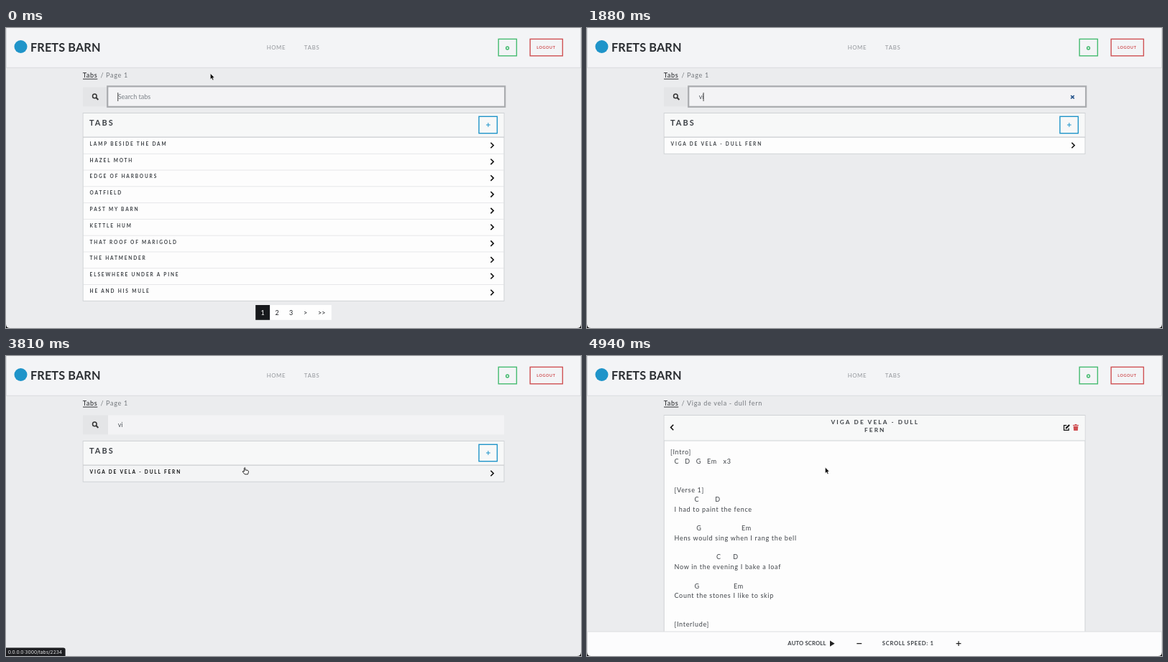
Write an HTML page that moves like this. It is 800 px wide and 418 px high and loops after 5 s.

```html
<!DOCTYPE html>
<html lang="en">
<head>
<meta charset="utf-8">
<title>Tabs search</title>
<style>
  html, body { margin: 0; width: 100%; height: 100%; overflow: hidden; background: #ebecee; }
  svg { display: block; width: 800px; height: 418px; font-family: Lato, sans-serif; }
</style>
</head>
<body>
<svg id="stage" viewBox="0 0 800 418"></svg>
<script>
const LOOP = 5000, ROW = 22.78, LINE = 13.35;
const GREEN = '#45bb70', RED = '#cf5053', BLUE = '#1f94c9';

const text = (x, y, size, str, fill, spacing = 0, more = '') =>
  `<text x="${x}" y="${y}" font-size="${size}" fill="${fill}" letter-spacing="${spacing}" ${more}>${str}</text>`;
const rect = (x, y, w, h, fill, more = '') =>
  `<rect x="${x}" y="${y}" width="${w}" height="${h}" fill="${fill}" ${more}/>`;
const frame = (x, y, w, h, color, width = 1.4, fill = 'none') =>
  rect(x, y, w, h, fill, `stroke="${color}" stroke-width="${width}"`);
const line = (d, color, width, more = '') =>
  `<path d="${d}" fill="none" stroke="${color}" stroke-width="${width}" ${more}/>`;
const shape = (d, fill, more = '') => `<path d="${d}" fill="${fill}" ${more}/>`;
const group = (id, ...parts) => `<g id="${id}">${parts.join('')}</g>`;
const middle = 'text-anchor="middle"', bold = 'font-weight="700"';

const song = 'VIGA DE VELA - DULL FERN';
const allSongs = ['LAMP BESIDE THE DAM', 'HAZEL MOTH', 'EDGE OF HARBOURS', 'OATFIELD', 'PAST MY BARN',
  'KETTLE HUM', 'THAT ROOF OF MARIGOLD', 'THE HATMENDER', 'ELSEWHERE UNDER A PINE', 'HE AND HIS MULE'];

const header = [
  rect(0, 0, 800, 58.3, '#f3f4f6', 'id="bar"'),
  line('M0 55.3H800M.5 0V55.3M799.5 0V55.3', '#d9dbde', 1, 'id="barEdge"'),
  group('headItems',
    `<circle id="logo" cx="20.5" cy="26" r="9" fill="${BLUE}"/>`,
    group('brand', text(34, 32.6, 16.3, 'FRETS BARN', '#2b2e32', .1, bold)),
    group('nav', text(362.7, 29.8, 7.8, 'HOME', '#92959a', .6), text(414.8, 29.8, 7.8, 'TABS', '#92959a', .8)),
    frame(685.2, 15.4, 25.2, 23.4, GREEN),
    `<circle cx="697.6" cy="28" r="1.9" fill="none" stroke="${GREEN}" stroke-width="1.5"/>`,
    frame(729.2, 15.4, 45.2, 23.4, RED),
    text(738.3, 29.2, 5.5, 'LOGOUT', RED, .55, bold))
].join('');

const crumbs = page =>
  text(106.8, 69.4, 9, 'Tabs', '#1d1f22', .7) + line('M107 71.1H127.3', '#1d1f22', .9) +
  text(131.5, 69.4, 9, '/', '#75797e', .7) + text(139, 69.4, 9, page, '#75797e', .7);

const songList = (id, titles) => {
  const bottom = 152.5 + ROW * titles.length;
  const rows = titles.map((title, i) => {
    const y = 152.5 + ROW * i;
    return (i ? line(`M107.5 ${y}H692.5`, '#e6e7e9', 1) : '') +
      text(116.6, y + 11.4, 6.5, title, '#3c4045', 1.85, `class="title" ${bold}`) +
      line(`M674.4 ${y + 7.2}L678.2 ${y + 11}L674.4 ${y + 14.8}`, '#111', 1.6);
  });
  return group(id, rect(107, 152, 586, bottom - 152, '#fdfdfd', 'class="body"'), ...rows,
    frame(107.2, 118.5, 585.8, bottom - 118.5, '#cfd2d5', 1));
};

const pager = group('pager',
  rect(347.2, 386, 20.1, 20.8, '#17191c'), rect(367.3, 386, 85.5, 20.8, '#fefefe'),
  ...['1', '2', '3', '&gt;', '&gt;&gt;'].map((label, i) =>
    text([357.2, 377, 396.7, 416.5, 439.3][i], 399.6, 9, label, i ? '#222529' : '#fff', 0, middle)));

const listPage = group('listPage',
  crumbs('Page 1'),
  rect(107, 82.5, 35, 26.8, '#e4e5e7'),
  '<circle cx="123.3" cy="94.9" r="2.8" fill="none" stroke="#333" stroke-width="1.5"/>',
  line('M125.3 97L128.4 100', '#333', 1.8),
  rect(142, 82.5, 551, 26.8, '#f3f3f5'),
  group('ring', frame(141.2, 81.3, 553, 28.5, '#a9abae', 2.2)),
  text(155.7, 99, 9, '', '#7b8087', 0, 'id="query"'),
  rect(0, 90, .9, 12, '#333', 'id="caret"'),
  group('clear', line('M673.2 94L677.8 98.4M677.8 94L673.2 98.4', '#27568c', 1.7)),
  songList('list0', allSongs),
  songList('list1', ['GREEN DUSTY LEVEE', song]),
  songList('list2', [song]),
  rect(107.7, 119, 584.8, 33, '#f7f8f8'),
  line('M107 152.2H693', '#cbced1', 1.2),
  text(116, 136.4, 10.9, 'TABS', '#3c4045', 2.1, bold),
  frame(658, 123.3, 25.4, 23.4, BLUE),
  line('M668 135H673.8M670.9 132.1V137.9', BLUE, 1),
  pager);

// [line index, x, text, x, text, ...]
const lyrics = [
  [0, 116, '[Intro]'],
  [1, 121.5, 'C', 136.3, 'D', 151.7, 'G', 167, 'Em', 189.5, 'x3'],
  [4, 121.5, '[Verse 1]'],
  [5, 149.5, 'C', 178.3, 'D'], [6, 121.5, 'I had to paint the fence'],
  [8, 152.3, 'G', 215, 'Em'], [9, 121.5, 'Hens would sing when I rang the bell'],
  [11, 180, 'C', 203.3, 'D'], [12, 121.5, 'Now in the evening I bake a loaf'],
  [14, 149.5, 'G', 204, 'Em'], [15, 121.5, 'Count the stones I like to skip'],
  [18, 121.5, '[Interlude]']
];
const lyricLine = ([row, ...parts]) => parts.map((x, i) =>
  i % 2 ? '' : text(x, 136.6 + LINE * row, 9, parts[i + 1], '#3f4348', .7)).join('');

const songPage = group('songPage',
  group('sheet',
    crumbs('Viga de vela - dull fern'),
    frame(107.2, 82.5, 585.8, 350, '#cfd2d5', 1, '#fdfdfd'),
    rect(107.7, 83, 584.8, 35, '#f7f8f8'),
    line('M107 118H693', '#cfd2d5', 1),
    text(400.8, 95.3, 8.2, song.slice(0, -5), '#3c4045', 2.15, `${middle} ${bold}`),
    text(400.8, 105.8, 8.2, song.slice(-4), '#3c4045', 2.15, `${middle} ${bold}`),
    group('sheetIcons',
      line('M120.2 95.8L116.6 99.5L120.2 103.2', '#111', 1.6),
      line('M667.3 96.6H663.6V103.4H670.2V100.5', '#111', 1.2),
      line('M666.2 101L671.2 96', '#111', 2),
      shape('M676 96H678.3L679 95H681L681.7 96H684V97.2H676ZM676.7 98H683.3L682.8 104H677.2Z', RED)),
    ...lyrics.map(lyricLine)),
  rect(0, 384, 800, 34, '#fcfcfd'),
  line('M0 384H800M.5 384V418M799.5 384V418', '#dcdee0', 1),
  group('auto', text(279.3, 403.3, 7.6, 'AUTO SCROLL', '#3c4045', .2, bold)),
  group('speed', text(410.8, 403.3, 7.6, 'SCROLL SPEED: 1', '#3c4045', .7, bold)),
  group('footIcons',
    shape('M338 396.6L344.6 400.7L338 404.8Z', '#222'),
    line('M375.3 400.6H382.2M513.6 400.6H520.4M517 397.2V404', '#222', 1.2)));

const bubble = group('bubble',
  shape('M0 406.6H79.8Q82.6 406.6 82.6 409.4V418H0Z', '#1d1e21'),
  text(2.8, 414.6, 6.7, '0.0.0.0:3000/tabs/2234', '#e4e5e7', 0, 'font-family="Inter, sans-serif"'));

const cursors = group('cursor',
  shape('M0 0V8.4L1.9 6.7L3.2 9.6L4.7 9L3.4 6.1H5.8Z', '#000', 'id="arrow" stroke="#fff" stroke-width=".6"'),
  line('M-1.5 0Q0 0 0 1.2V8.8Q0 10 -1.5 10M1.5 0Q0 0 0 1.2M0 8.8Q0 10 1.5 10', '#222', .9, 'id="beam"'),
  shape('M0 1.2Q.8-.3 1.6 1.2V4Q5.8 3.6 6 5.6Q6 8 5 9.8H.8L-2.3 6Q-1.6 4.6 0 6Z', '#fff',
    'id="hand" stroke="#111" stroke-width=".9"'));

const corners = shape('M0 412.5Q0 418 5.5 418H0ZM800 412.5Q800 418 794.5 418H800Z', '#111');

const stage = document.getElementById('stage');
stage.innerHTML = rect(0, 0, 800, 418, '#ebecee') + listPage + songPage + header + bubble + cursors + corners;

const el = Object.fromEntries([...stage.querySelectorAll('[id]')].map(node => [node.id, node]));
const hoverBody = el.list2.querySelector('.body'), hoverTitle = el.list2.querySelector('.title');

const show = (id, on) => el[id].setAttribute('opacity', +on);
const move = (id, x, y) => el[id].setAttribute('transform', `translate(${x} ${y})`);
const ramp = (t, from, to) => Math.min(1, Math.max(0, (t - from) / (to - from)));
const within = (t, from, to) => t >= from && t < to;

function drawSearch(t) {
  const query = t < 440 ? '' : t < 880 ? 'v' : 'vi';
  el.query.textContent = query || 'Search tabs';
  el.query.setAttribute('fill', query ? '#50555b' : '#7b8087');
  el.caret.setAttribute('x', [155.3, 159.6, 161.6][query.length]);
  show('caret', t < 60 || within(t, 440, 1380) || within(t, 1880, 2380) || within(t, 2880, 3380));
  show('clear', query && t < 3500);
  show('ring', 1 - ramp(t, 3500, 3630));
  show('list0', t < 750);
  show('pager', t < 750);
  show('list1', within(t, 750, 1130));
  show('list2', t >= 1130);
  hoverBody.setAttribute('fill', t < 2880 ? '#fdfdfd' : '#f3f4f5');
  hoverTitle.setAttribute('fill', t < 2880 ? '#3c4045' : '#0c0d0e');
}

function drawCursor(t) {
  const p = ramp(t, 2290, 2810), ease = p * p * (3 - 2 * p);
  let x = 284.3, y = 63.2;
  if (t >= 2880) [x, y] = [331.4, 155];
  else if (t >= 2310) [x, y] = [290 + 40.8 * ease, 82 + 70 * ease];
  const hand = within(t, 2880, 3940), beam = y > 80 && y < 108;
  move('cursor', x, y);
  show('cursor', t < 440 || t >= 2310);
  show('hand', hand);
  show('beam', beam);
  show('arrow', !hand && !beam);
}

function drawPages(t) {
  const opened = t >= 3940, loading = within(t, 3940, 4000);
  show('listPage', !opened);
  show('songPage', opened);
  for (const id of ['logo', 'sheetIcons', 'footIcons']) show(id, !loading);
  const drop = loading ? 3.3 : 0;
  move('sheet', 0, drop);
  move('barEdge', 0, drop);
  el.bar.setAttribute('height', 55.3 + drop);
  move('headItems', 0, drop / 2);
  move('brand', loading ? -22.2 : 0, loading ? .7 : 0);
  move('nav', loading ? -11.3 : 0, 0);
  move('auto', loading ? 10 : 0, 0);
  move('speed', loading ? -3 : 0, 0);
  show('bubble', ramp(t, 3130, 3330) - ramp(t, 4250, 4500));
}

function draw() {
  const t = performance.now() % LOOP;
  drawSearch(t);
  drawCursor(t);
  drawPages(t);
  requestAnimationFrame(draw);
}
draw();
</script>
</body>
</html>
```
